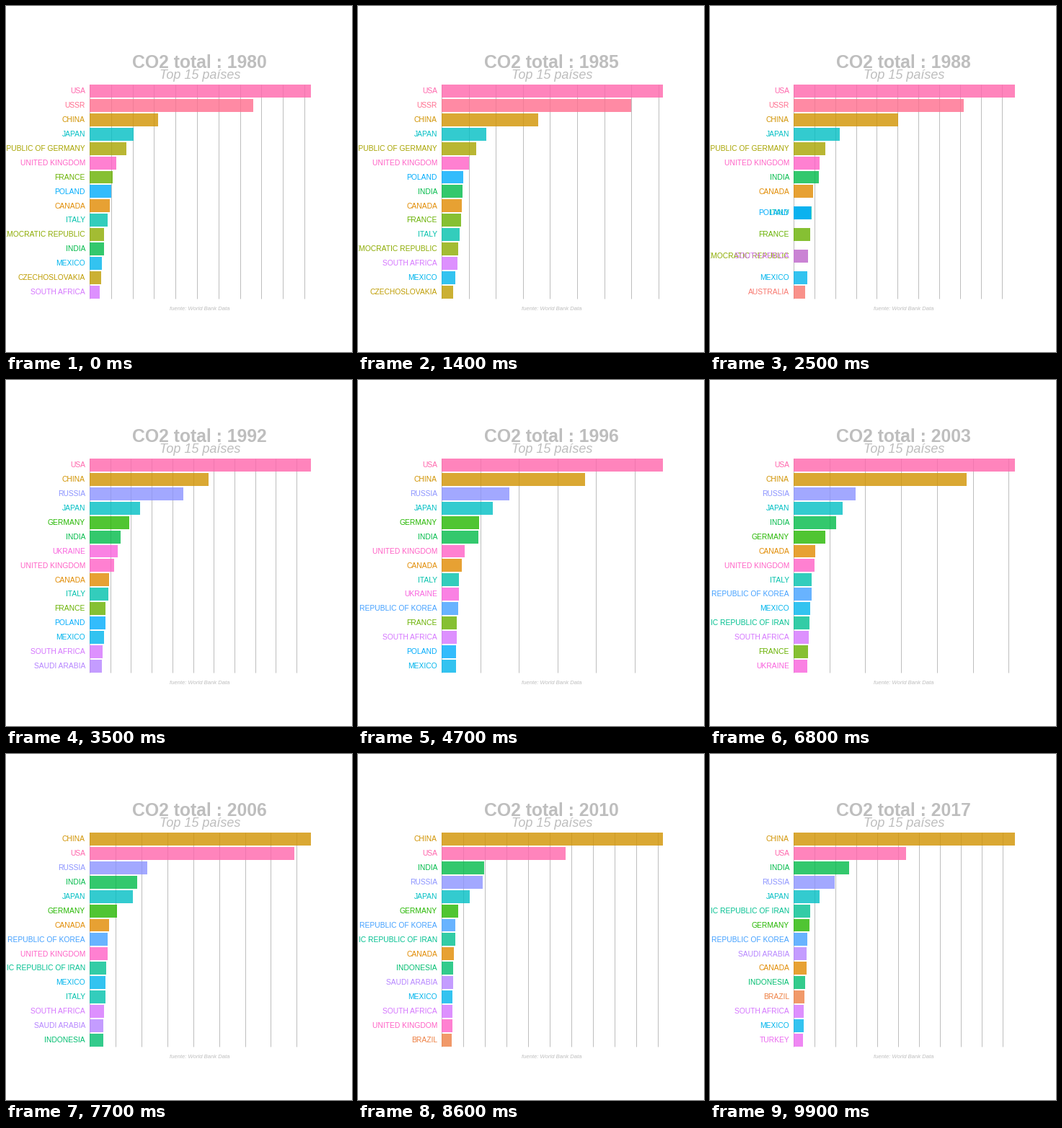
Animation, 480 px wide and 480 px high, one loop 10000 ms. Source, as a matplotlib script:

```python
import numpy as np
import matplotlib.pyplot as plt
from matplotlib.animation import FuncAnimation
from matplotlib.patches import Rectangle

SIZE, DPI = 480, 100
LEFT, RIGHT = 116, 423
TOP, PITCH, BAR = 109.1, 19.9, 17.9
GREY = "#BEBEBE"
FIRST, LAST, TOP_N = 1980, 2017, 15

FRG = "FEDERAL REPUBLIC OF GERMANY"
GDR = "FORMER GERMAN DEMOCRATIC REPUBLIC"
IRAN = "ISLAMIC REPUBLIC OF IRAN"
KOREA = "REPUBLIC OF KOREA"

NAMES = ["AUSTRALIA", "BRAZIL", "CANADA", "CHINA", "CZECHOSLOVAKIA", FRG, GDR,
         "FRANCE", "GERMANY", "INDIA", "INDONESIA", IRAN, "ITALY", "JAPAN",
         "KAZAKHSTAN", "MEXICO", "POLAND", KOREA, "RUSSIA", "SAUDI ARABIA",
         "SOUTH AFRICA", "TURKEY", "UKRAINE", "UNITED KINGDOM", "USA", "USSR"]

# Emissions in thousand kilotonnes of carbon at a few anchor years.
EARLY_YEARS = (1980, 1985, 1990)
EARLY = {
    "USSR": (952, 1051, 1012),
    "JAPAN": (256, 247, 290),
    FRG: (214, 191.5, 192),
    "UNITED KINGDOM": (155.5, 152, 156),
    "FRANCE": (134, 107.5, 99),
    "POLAND": (126, 120, 100),
    "CANADA": (117.5, 112, 120),
    "ITALY": (105, 100, 112),
    GDR: (84.2, 92.5, 82),
    "INDIA": (83.8, 116, 165),
    "MEXICO": (71.5, 76, 86),
    "CZECHOSLOVAKIA": (67, 64, 57),
    "SOUTH AFRICA": (60, 87, 84),
    "AUSTRALIA": (55, 60, 72),
    "SAUDI ARABIA": (48, 47, 58),
}

LATE_YEARS = (1991, 1992, 1996, 2003, 2011, 2017)
LATE = {
    "USSR": (975,),
    "RUSSIA": (0, 566, 438.5, 432, 474, 490),
    "UKRAINE": (0, 170, 111, 95, 78, 50),
    "JAPAN": (298, 305, 331, 342, 325, 311),
    "GERMANY": (254, 239.5, 243, 221, 195, 191),
    "INDIA": (175, 187, 238, 296.5, 492, 663),
    "UNITED KINGDOM": (157, 148, 149, 146, 121, 100),
    "CANADA": (115, 118, 130, 151, 144, 153),
    "ITALY": (114, 113, 112.5, 127, 108, 90),
    "FRANCE": (104, 97, 99, 102, 92, 85),
    "POLAND": (97, 95, 95, 82, 87, 84),
    "MEXICO": (85, 86, 93, 116, 129, 119),
    "SOUTH AFRICA": (82, 79, 97, 106, 127, 122),
    "SAUDI ARABIA": (72, 74, 78, 89, 134, 156),
    "AUSTRALIA": (70, 73, 83, 94, 106, 104),
    KOREA: (72, 73, 107, 125, 160.5, 164),
    IRAN: (62, 63, 73, 111, 158, 198),
    "INDONESIA": (45, 50, 65, 84, 136, 137),
    "BRAZIL": (60, 60, 75, 88, 118, 130),
    "TURKEY": (39, 40, 50, 59, 85, 113),
}

GIANTS = {
    "USA": {1980: 1288, 1982: 1200, 1983: 1196, 1985: 1224.7, 1986: 1228,
            1988: 1335, 1990: 1314, 1991: 1312, 1992: 1337, 1996: 1432,
            1999: 1500, 2000: 1555, 2001: 1528, 2003: 1543, 2005: 1577,
            2007: 1590, 2009: 1437, 2011: 1433, 2017: 1342},
    "CHINA": {1980: 398.5, 1985: 534.5, 1990: 671, 1992: 718.6, 1996: 928,
              2000: 930, 2002: 1010, 2003: 1206, 2005: 1565, 2007: 1853,
              2009: 2110, 2011: 2558, 2014: 2690, 2016: 2602, 2017: 2642},
}


def hue_color(hue, chroma=100, lum=65):
    """Polar LUV to sRGB."""
    h = np.radians(hue)
    y = ((lum + 16) / 116) ** 3
    u = chroma * np.cos(h) / (13 * lum) + 0.1978398
    v = chroma * np.sin(h) / (13 * lum) + 0.4683363
    x = 9 * y * u / (4 * v)
    z = -x / 3 - 5 * y + 3 * y / v
    m = np.array([[3.240479, -1.537150, -0.498535],
                  [-0.969256, 1.875992, 0.041556],
                  [0.055648, -0.204043, 1.057311]])
    rgb = np.clip(m @ (x, y, z), 0, 1)
    return tuple(np.where(rgb > 0.00304,
                          1.055 * rgb ** (1 / 2.4) - 0.055, 12.92 * rgb))


COLORS = {n: hue_color(15 + 360 * i / len(NAMES)) for i, n in enumerate(NAMES)}


def top_of(year):
    """Map each leading country to its (rank, value) in a year."""
    values = {n: np.interp(year, list(p), list(p.values()))
              for n, p in GIANTS.items()}
    years, table = ((EARLY_YEARS, EARLY) if year <= EARLY_YEARS[-1]
                    else (LATE_YEARS, LATE))
    for name, row in table.items():
        padded = row + (0,) * (len(years) - len(row))
        values[name] = np.interp(year, years, padded)
    order = sorted(values, key=values.get, reverse=True)[:TOP_N]
    return {n: (rank, values[n]) for rank, n in enumerate(order)}


STATES = {y: top_of(y) for y in range(FIRST, LAST + 1)}


def blend(a, b):
    """Halfway pose of the countries found in both states."""
    return {n: tuple((p + q) / 2 for p, q in zip(a[n], b[n]))
            for n in a if n in b}


def moment(i):
    """Bars and title year for a frame number."""
    if i <= 75:
        k, phase = divmod(i + 2, 3)
        year = FIRST + k
        if phase == 0:
            return blend(STATES[year - 1], STATES[year]), year - 1
        return STATES[year], year
    year = FIRST + 25 + (i - 74) // 2
    return STATES[year], year - (i % 2 == 0)


def tick_step(high, want=5):
    """Labelling step scored by simplicity, coverage and density."""
    best, step = -9, None
    for i, q in enumerate((1, 5, 2, 2.5, 4, 3)):
        size = q * (1000 if q == 1 else 100)
        for n in range(2, 10):
            end = size * n
            cover = 1 - 50 * ((high - end) / high) ** 2
            ratio = (n / end) / ((want - 1) / max(end, high))
            density = 2 - max(ratio, 1 / ratio)
            score = 0.25 * (1 - i / 5) + 0.2 * cover + 0.5 * density
            if score > best:
                best, step = score, size
    return step


fig = plt.figure(figsize=(SIZE / DPI, SIZE / DPI), dpi=DPI, facecolor="white")
ax = fig.add_axes((0, 0, 1, 1))


def write(x, y, text, px, color=GREY, **kw):
    ax.text(x, y, text, fontsize=px * 72 / DPI, color=color, va="baseline",
            family="Liberation Sans", **kw)


def draw(i):
    bars, year = moment(i)
    ax.clear()
    ax.axis("off")
    ax.set_xlim(0, SIZE)
    ax.set_ylim(SIZE, 0)

    high = max(value for _, value in bars.values())
    scale = (RIGHT - LEFT) / high
    bottom = TOP + PITCH * (TOP_N - 1) + BAR
    for tick in np.arange(0, high + 1, tick_step(high) / 2):
        x = LEFT + tick * scale
        ax.plot([x, x], [TOP, bottom], color=GREY, lw=72 / DPI,
                solid_capstyle="butt", snap=True, zorder=1)

    for name in NAMES:
        if name not in bars:
            continue
        rank, value = bars[name]
        y = TOP + rank * PITCH
        ax.add_patch(Rectangle((LEFT, y), value * scale, BAR, lw=0, alpha=0.8,
                               color=COLORS[name], zorder=2))
        write(110, y + BAR / 2 + 3.3, name, 10.2, COLORS[name], ha="right")

    write(268.5, 86, f"CO2 total : {year}", 24.8, ha="center", weight="bold")
    write(269.5, 101, "Top 15 países", 18, ha="center", style="italic")
    write(269, 422, "fuente: World Bank Data", 7.6, ha="center", style="italic")
    return []


anim = FuncAnimation(fig, draw, frames=100, interval=100, repeat=True,
                     repeat_delay=0, blit=False)
plt.show()
```
